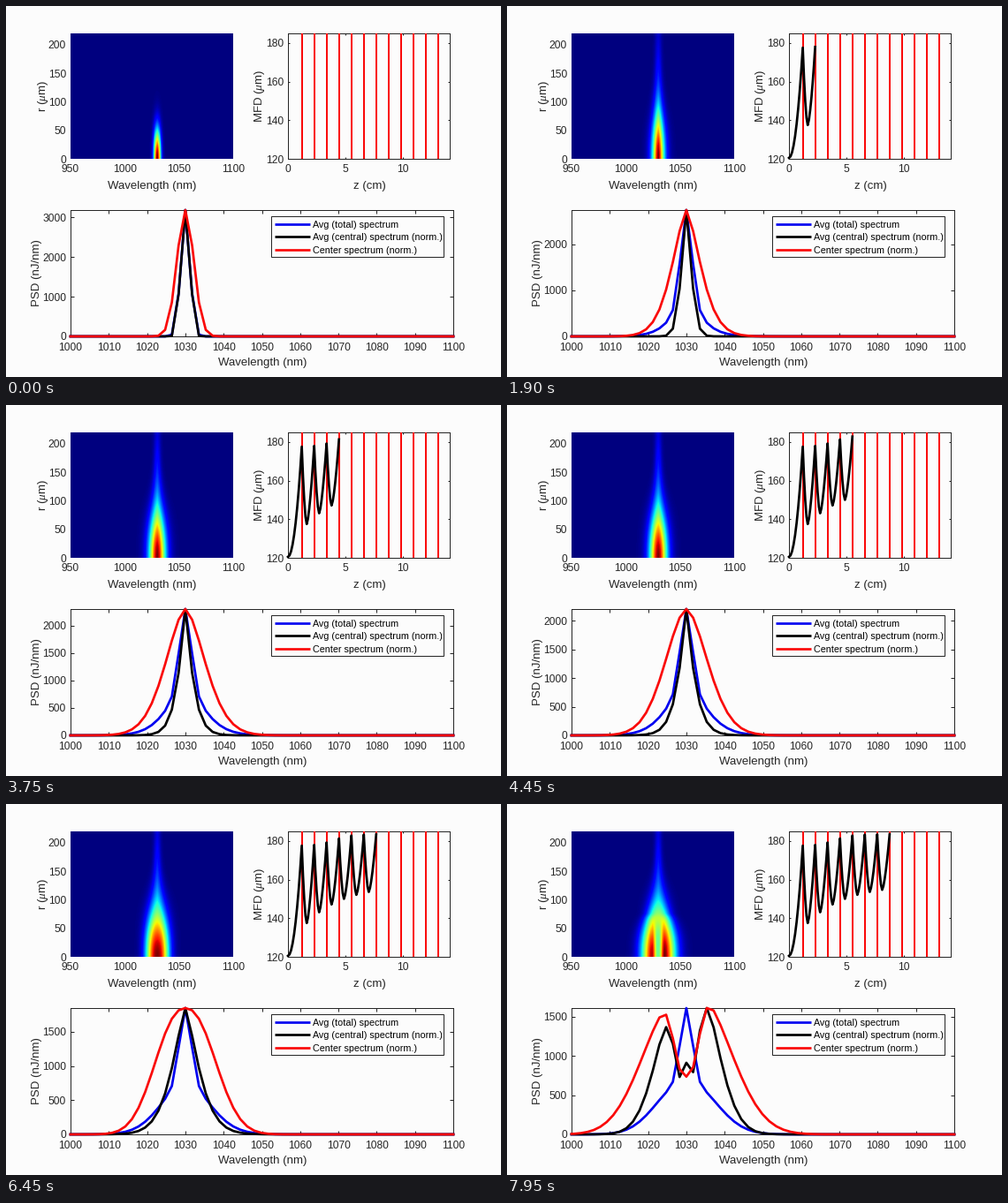
A matplotlib script that plays this animation: 560 px wide and 420 px high, repeating every 8 s.

```python
import numpy as np
import matplotlib.pyplot as plt
from matplotlib.animation import FuncAnimation
from matplotlib.patches import Rectangle

W, H, DPI = 560, 420, 70
FRAMES, INTERVAL = 160, 50
INK, PAPER = "#262626", "#fcfcfc"
BLUE, BLACK, RED = "#0000f0", "#000000", "#fa0808"


def px(v):
    """Pixels to points."""
    return v * 72 / DPI


plt.rcParams.update({
    "font.family": "Liberation Sans", "font.size": px(12),
    "mathtext.fontset": "custom", "mathtext.it": "Liberation Serif:italic",
    "text.color": INK, "axes.edgecolor": INK, "axes.linewidth": px(1),
    "xtick.color": INK, "ytick.color": INK,
})

# --- beam path: 10 steps inside each plate, 10 steps through each gap ---
FIRST, GAP, N_PLATES, LEAD = 1.2, 1.08, 12, 9
START = 120.5


def plate(k):
    return FIRST + GAP * k


def peak(k):
    return 177.5 + 6 / (1 + np.exp(1.5 * (2.6 - k)))


def dip(k):
    return 157.5 - 20 * 0.72 ** k


def state(n):
    """Distance, mode diameter and number of plates passed at frame n."""
    if n < LEAD:
        u = n / LEAD
        return FIRST * u, START + (peak(0) - START) * u ** 2, 0.0
    k, j = divmod(n - LEAD, 20)
    if j <= 10:
        return plate(k), peak(k), k + j / 10
    u = (j - 10) / 10
    if u < 0.4:
        rise = (peak(k) - dip(k)) * (1 - u / 0.4) ** 1.7
    else:
        rise = (peak(k + 1) - dip(k)) * ((u - 0.4) / 0.6) ** 1.5
    return plate(k) + GAP * u, dip(k) + rise, k + 1.0


Z, MFD, PASSED = np.array([state(n) for n in range(FRAMES)]).T

# --- spectra on a 0.5 THz grid, centred on 1030 nm ---
K = np.arange(-52, 41)
LAM = 299792.458 / (299792.458 / 1030 - 0.5 * K)


def column(p):
    return np.asarray(p, float)[..., None]


def bell(a, b):
    return np.exp(-(np.abs(K) / a) ** b)


def split(p):
    """How far the single hump has parted into two lobes."""
    return np.clip((p - 6) / 2, 0, 1)


def lobes(envelope, notch, skew, core=0):
    s = envelope * (1 - notch * bell(2.3, 2.7)) * (1 + skew * np.tanh(K / 2))
    s = s + core * bell(0.6, 2)
    return s / s.max(axis=-1, keepdims=True)


def total(p):
    p = column(p)
    grown = 1 - np.exp(-p)
    share = 0.42 * grown
    return ((1 - share) * bell(0.96 + 0.24 * grown, 2)
            + share * bell(0.96 + p ** 0.77, 1 + 0.14 * p))


def central(p):
    p = column(p)
    s = split(p)
    hump = bell(0.96 + 0.0083 * p ** 3, 1.15 + 0.07 * (p - 4.2) ** 2)
    return lobes(hump, 0.73 * s, 0.09 * s, 0.14 * s)


def center(p):
    p = column(p)
    s = split(p)
    power = 1.35 + 0.026 * np.minimum(p, 6) ** 2 + 0.65 * np.exp(-p)
    return lobes(bell(1.744 + 0.67 * p + s, power), 0.61 * s, 0.03 * s)


def psd_top(p):
    return np.interp(p, [0, 1.9, 3, 4, 5, 6, 8],
                     [3178, 2750, 2444, 2208, 2017, 1849, 1612])


# --- wavelength / radius map ---
R = (np.arange(142) + 0.5) / 142 * 220
COLS = 950 + (np.arange(184) + 0.5) / 184 * 150
SLOT = np.interp(COLS, LAM, np.arange(len(LAM)))
LEFT = SLOT.astype(int)
FRAC = SLOT - LEFT


def heat(n):
    p = PASSED[n]
    waist = 0.42 * MFD[n]
    halo = 0.3 * (1 - np.exp(-p))
    level = ((1 - halo) * np.exp(-(R / waist) ** 2)
             + halo * np.exp(-(R / (2.5 * waist)) ** 2))
    rows = center(p * np.exp(-(R / 115) ** 3)) * level[:, None]
    img = rows[:, LEFT] * (1 - FRAC) + rows[:, LEFT + 1] * FRAC
    return img / img.max()


# --- figure ---
fig = plt.figure(figsize=(W / DPI, H / DPI), dpi=DPI, facecolor=PAPER)


def panel(x0, y0, x1, y1, xlim, ylim, xticks, yticks, tick):
    ax = fig.add_axes([x0 / W, 1 - y1 / H, (x1 - x0) / W, (y1 - y0) / H],
                      facecolor=PAPER)
    ax.set(xlim=xlim, ylim=ylim, xticks=xticks, yticks=yticks)
    ax.tick_params(direction="in", length=px(tick), width=px(1),
                   top=True, right=True)
    ax.tick_params(axis="x", pad=px(6.5))
    ax.tick_params(axis="y", pad=px(5))
    for s in ax.spines.values():
        s.set_zorder(1)
    return ax


ax_map = panel(73, 31, 257, 173, (950, 1100), (0, 220),
               range(950, 1101, 50), range(0, 201, 50), 0)
for s in ax_map.spines.values():
    s.set_visible(False)
image = ax_map.imshow(heat(0), cmap="jet", vmin=0, vmax=1, origin="lower",
                      extent=(950, 1100, 0, 220), aspect="auto",
                      interpolation="nearest")

ax_mfd = panel(319, 31, 502, 173, (0, 14.08), (120, 185),
               [0, 5, 10], range(120, 181, 20), 2)
ax_mfd.vlines(plate(np.arange(N_PLATES)), 120, 185, color=RED, lw=px(2),
              zorder=2)
trace, = ax_mfd.plot([], [], color=BLACK, lw=px(2.7), zorder=3,
                     clip_on=False)

ax_psd = panel(73, 231, 506, 374, (1000, 1100), (0, psd_top(0)),
               range(1000, 1101, 10), range(0, 3001, 1000), 4)
inside = LAM[(LAM > 1000) & (LAM < 1100)]
X = np.concatenate([[1000], inside, [1100]])
curves = [(spectrum, ax_psd.plot([], [], color=c, lw=px(2.7), zorder=3,
                                 clip_on=False)[0])
          for spectrum, c in ((total, BLUE), (central, BLACK), (center, RED))]

# labels and legend in pixel coordinates
over = fig.add_axes([0, 0, 1, 1], zorder=5)
over.set(xlim=(0, W), ylim=(H, 0))
over.axis("off")


def label(x, y, text, rotation=0):
    over.text(x, y, text, size=px(13.3), rotation=rotation,
              ha="center", va="center")


label(165.5, 204.5, "Wavelength (nm)")
label(411, 204.5, "z (cm)")
label(290, 404.5, "Wavelength (nm)")
label(41.5, 102, r"r ($\mu$m)", 90)
label(287, 102, r"MFD ($\mu$m)", 90)
label(35, 302, "PSD (nJ/nm)", 90)

over.add_patch(Rectangle((300, 238), 195, 46, fc=PAPER, ec=INK, lw=px(1)))
for i, (color, text) in enumerate((
        (BLUE, "Avg (total) spectrum"),
        (BLACK, "Avg (central) spectrum (norm.)"),
        (RED, "Center spectrum (norm.)"))):
    y = 247 + 14.3 * i
    over.plot([304, 344], [y, y], color=color, lw=px(2.7),
              solid_capstyle="butt")
    over.text(347, y + 4, text, size=px(10.7), color=BLACK, va="baseline")


def update(n):
    p = PASSED[n]
    image.set_data(heat(n))
    trace.set_data(Z[:n + 1], MFD[:n + 1])
    top = psd_top(p)
    for spectrum, line in curves:
        line.set_data(X, top * np.interp(X, LAM, spectrum(p)))
    ax_psd.set_yticks(np.arange(0, top, 1000 if top > 2500 else 500))
    ax_psd.set_ylim(0, top)
    return [image, trace] + [line for _, line in curves]


anim = FuncAnimation(fig, update, frames=FRAMES, interval=INTERVAL,
                     init_func=lambda: update(0), repeat=True, blit=False)
plt.show()
```
